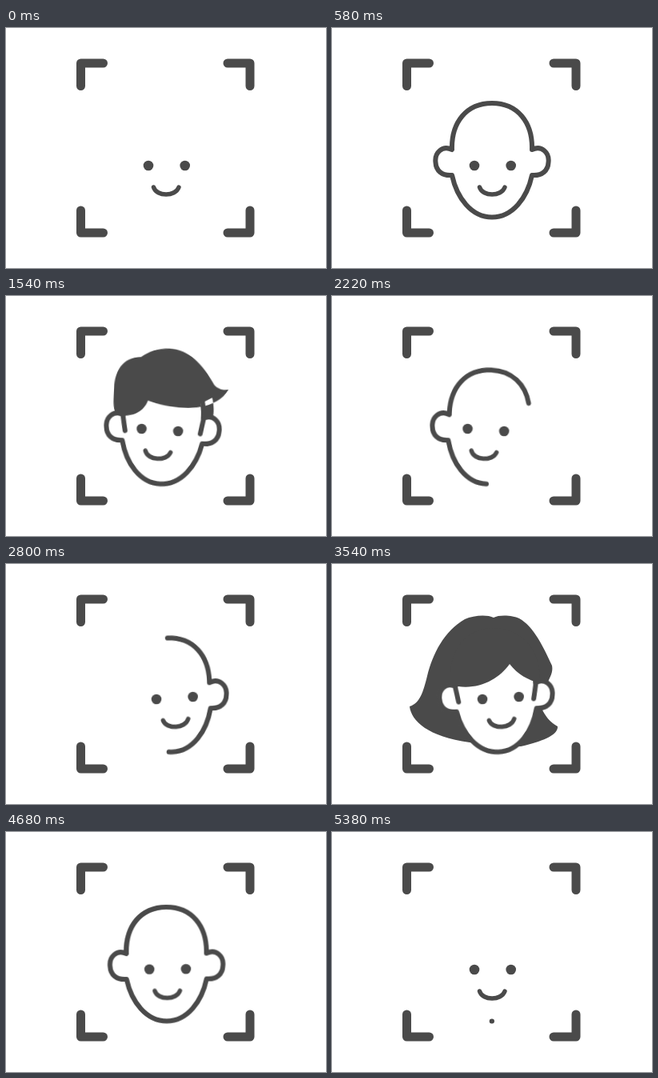
These frames come from a looping animation (400x300 px, 5400 ms). An HTML page:

```html
<!DOCTYPE html>
<html lang="en">
<head>
<meta charset="utf-8">
<title>Face scan</title>
<style>
  html, body { margin: 0; width: 100%; height: 100%; overflow: hidden; background: #fff; }
  svg { display: block; width: 100%; height: 100%; }

  :root {
    --ink: #4a4a4a;
    --sine: cubic-bezier(.37, 0, .63, 1);
    --swift: cubic-bezier(.4, 0, .3, 1);

    --short-flat: path("M251 146C251 139 250 132 247 125C238 105 222 94 200 94C190 94 180 96 172 101C161 108 154 118 152 128C150 136 149 143 149 150C149 134 155 117 166 107C180 91 222 90 236 107C246 117 251 131 251 146ZM247 130L249 130C251 137 251 145 251 150L250 152Z");
    --short-full: path("M280 110C276 110 268 112 261 105C246 82 228 66 205 66C190 66 178 72 169 79C145 80 137 100 137 118C137 132 136 145 141 151C152 156 174 152 180 133C200 140 228 141 246 136C260 132 274 123 280 110ZM246 134L260 126C263 136 263 145 262 151L250 152Z");
    --short-rest: path("M280 115C275 116 268 116 262 110C246 84 228 67 204 67C190 67 178 72 169 79C145 80 137 100 137 118C137 132 136 145 141 151C152 156 174 152 180 133C200 140 228 142 246 138C260 135 273 128 280 115ZM246 134L260 126C263 136 263 145 262 151L250 152Z");

    --long-flat: path("M202 95C210 94 220 96 228 100C243 108 253 122 254 140C254 153 252 165 250 175C248 190 240 205 226 212L180 212C165 205 158 190 156 175C154 165 153 155 153 145C154 125 162 108 175 100C183 96 194 95 202 95Z");
    --long-swing: path("M202 67C209 63 226 64 234 68C252 78 264 103 275 127C278 142 262 150 262 180C266 190 273 198 282 203C283 214 262 222 236 228L172 223C120 216 99 196 97 178C110 174 114 160 119 140C126 112 140 84 166 69C177 64 194 63 202 67Z");
    --long-full: path("M202 67C209 63 226 64 234 69C262 82 275 112 282 145C286 165 292 178 302 184C305 196 290 220 236 225L172 224C117 220 102 200 105 185C115 178 121 165 125 145C132 112 145 82 172 69C180 64 196 63 202 67Z");

    --fringe-flat: path("M153 150C154 118 172 95 203 93C232 92 256 115 256 147C256 115 232 92 203 93C172 95 154 118 153 150Z");
    --fringe-full: path("M148 151C180 160 208 145 222 125C232 138 245 145 260 149C262 105 235 80 202 80C165 80 145 110 148 151Z");
  }

  .line { fill: none; stroke: var(--ink); stroke-linecap: round; stroke-linejoin: round; }
  .fill { fill: var(--ink); }
  svg * { animation: 5400ms linear infinite; }

  .head { transform-origin: 200px 167px; animation-name: head; }
  .features { transform-origin: 201px 172px; animation-name: features; }
  .eye { transform-box: fill-box; transform-origin: center; animation-name: blink; }
  .face { fill: #fff; animation-name: trace, start, shown; }
  .side { stroke-dasharray: 1 3; animation-name: side; }
  .short { animation-name: short, short-shown; }
  .drift { animation-name: drift; }
  .long { animation-name: long, long-shown; }
  .fringe { animation-name: fringe, long-shown; }

  /* Outline drawn from the crown, wiped towards the chin */
  @keyframes trace {
    0%, .74% { stroke-dasharray: 0 1; animation-timing-function: var(--sine); }
    10.74% { stroke-dasharray: 1 0; }
    38.89% { stroke-dasharray: 1 0; animation-timing-function: var(--sine); }
    48.89% { stroke-dasharray: 0 1; animation-timing-function: var(--sine); }
    58.89% { stroke-dasharray: 1 0; }
    90% { stroke-dasharray: 1 0; animation-timing-function: var(--sine); }
    100% { stroke-dasharray: 0 1; }
  }
  @keyframes start {
    0% { stroke-dashoffset: -.5; animation-timing-function: step-end; }
    25% { stroke-dashoffset: 0; animation-timing-function: step-end; }
    48.89% { stroke-dashoffset: -.5; animation-timing-function: step-end; }
    75%, 100% { stroke-dashoffset: 0; }
  }
  @keyframes shown {
    0% { stroke-opacity: 0; animation-timing-function: step-end; }
    .75%, 100% { stroke-opacity: 1; }
  }

  @keyframes head {
    0%, 17.78% { transform: translate(0, 0) rotate(0deg); animation-timing-function: var(--sine); }
    23.33% { transform: translate(-4px, -1.5px) rotate(2.5deg); }
    48.88% { transform: translate(-4px, -1.5px) rotate(2.5deg); }
    48.89%, 82% { transform: translate(5px, -1.5px) rotate(-2.5deg); animation-timing-function: var(--sine); }
    90%, 100% { transform: translate(0, 0) rotate(0deg); }
  }
  @keyframes features {
    0%, 17.78% { transform: translate(0, 0) rotate(0deg); animation-timing-function: var(--sine); }
    23.33% { transform: translate(-8.5px, -4.5px) rotate(3.8deg); }
    44% { transform: translate(-8.5px, -4.5px) rotate(3.8deg); animation-timing-function: var(--sine); }
    50%, 82% { transform: translate(10px, -4.5px) rotate(-3.8deg); animation-timing-function: var(--sine); }
    90%, 100% { transform: translate(0, 0) rotate(0deg); }
  }
  @keyframes blink {
    0%, 15.56%, 19.26%, 100% { transform: translateY(0) scaleY(1); }
    17.41% { transform: translateY(3px) scaleY(.35); }
  }
  @keyframes side {
    0%, 12.5% { stroke-dashoffset: 1.4; }
    17.04%, 28.52% { stroke-dashoffset: 0; }
    33.5%, 60% { stroke-dashoffset: 1.4; }
    65%, 80.37% { stroke-dashoffset: 0; }
    87%, 100% { stroke-dashoffset: 1.4; }
  }

  @keyframes short {
    0%, 11.11% { d: var(--short-flat); animation-timing-function: var(--swift); }
    17.04%, 17.78% { d: var(--short-full); animation-timing-function: var(--sine); }
    23.33%, 28.52% { d: var(--short-rest); animation-timing-function: var(--sine); }
    36%, 100% { d: var(--short-flat); }
  }
  @keyframes short-shown {
    0% { opacity: 0; animation-timing-function: step-end; }
    11.11% { opacity: 1; animation-timing-function: step-end; }
    36%, 100% { opacity: 0; }
  }

  @keyframes drift {
    0%, 82% { transform: translate(0, 0); animation-timing-function: var(--sine); }
    90%, 100% { transform: translate(-5px, 1.5px); }
  }
  @keyframes long {
    0%, 58.89% { d: var(--long-flat); animation-timing-function: var(--swift); }
    65.56% { d: var(--long-swing); animation-timing-function: var(--sine); }
    70.74%, 80.37% { d: var(--long-full); animation-timing-function: var(--sine); }
    88.89%, 100% { d: var(--long-flat); }
  }
  @keyframes fringe {
    0%, 58.89% { d: var(--fringe-flat); animation-timing-function: var(--swift); }
    65%, 80.37% { d: var(--fringe-full); animation-timing-function: var(--sine); }
    88.89%, 100% { d: var(--fringe-flat); }
  }
  @keyframes long-shown {
    0% { opacity: 0; animation-timing-function: step-end; }
    58.89% { opacity: 1; animation-timing-function: step-end; }
    88.89%, 100% { opacity: 0; }
  }
</style>
</head>
<body>
<svg viewBox="0 0 400 300">
  <path class="line" stroke-width="11" d="M121.5 44H93.5V72.5M277 44H305V72.5M93.5 228V256H121.5M305 228V256H277"/>

  <g class="drift"><path class="fill long"/></g>

  <g class="head">
    <path class="line face" stroke-width="6" pathLength="1" d="M200 236.5C174 236.5 156 212 150 184C137 185 130 178 129.500 168C128 156 138 146 150 152C149 118 168 94 200 94C232 94 251 118 250 152C262 146 272 156 270.500 168C270 178 263 185 250 184C244 212 226 236.500 200 236.500Z"/>
    <path class="line side" stroke-width="6" pathLength="1" d="M149 150L153 172"/>
    <path class="line side" stroke-width="6" pathLength="1" d="M251 150L247 172"/>
    <path class="fill short"/>
  </g>

  <g class="drift"><path class="fill fringe"/></g>

  <g class="features">
    <circle class="fill eye" cx="178" cy="172" r="6.3"/>
    <circle class="fill eye" cx="223.700" cy="172" r="6.3"/>
    <path class="line" stroke-width="5.500" d="M184.500 199C188 211 212 211 216 199"/>
  </g>
</svg>
</body>
</html>
```
